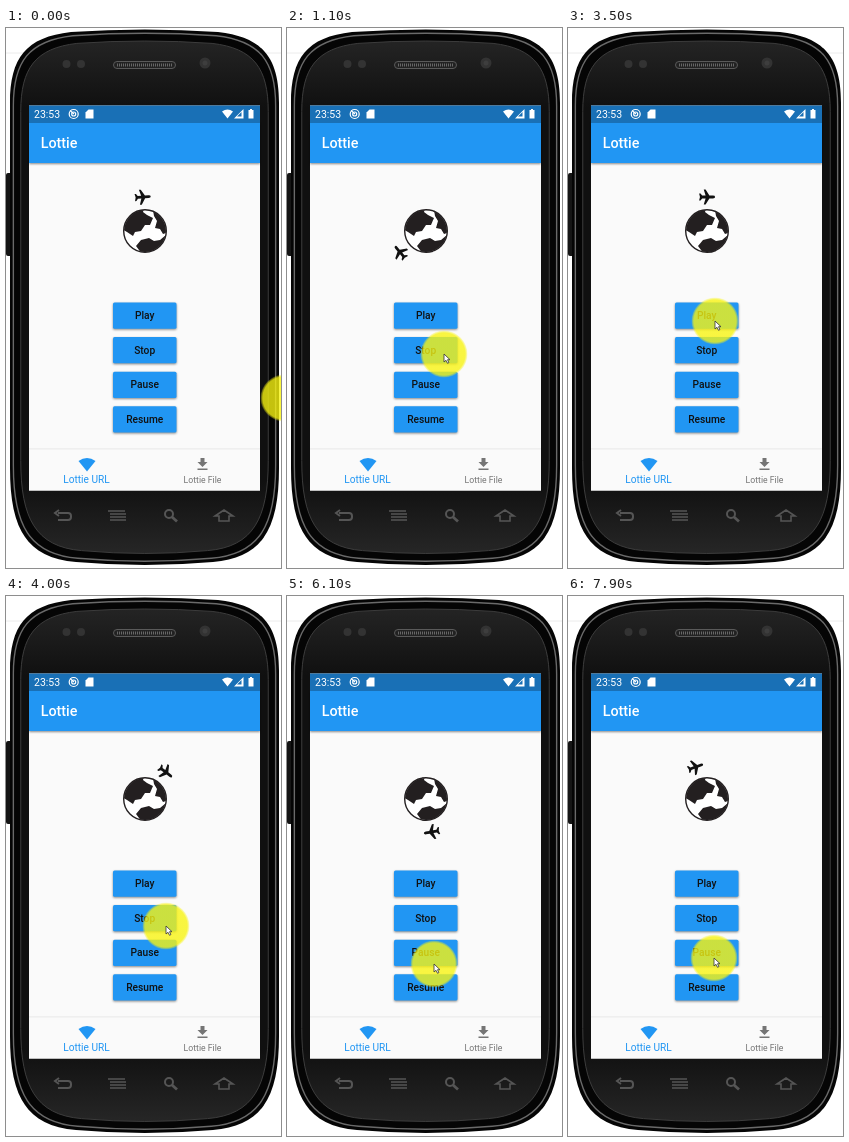
An HTML page that plays this animation: 275 by 540 pixels, repeating every 8 s.

```html
<!DOCTYPE html>
<html lang="en">
<head>
<meta charset="utf-8">
<title>Lottie player</title>
<style>
html, body { margin: 0; width: 100%; height: 100%; overflow: hidden; background: #fff; }
svg { display: block; width: 275px; height: 540px; font-family: Roboto, Arial, sans-serif; }
.shade { filter: drop-shadow(0 1.2px 1.2px rgba(0,0,0,.45)); }
.medium { font-weight: 500; }
</style>
</head>
<body>
<svg viewBox="0 0 275 540">
  <defs>
    <linearGradient id="face" x2="0" y2="1">
      <stop offset="0" stop-color="#242424"/><stop offset=".13" stop-color="#101010"/>
      <stop offset=".86" stop-color="#101010"/><stop offset="1" stop-color="#262626"/>
    </linearGradient>
    <radialGradient id="glow">
      <stop offset=".9" stop-color="#f8f410"/><stop offset="1" stop-color="#f8f410" stop-opacity=".2"/>
    </radialGradient>
    <path id="body" vector-effect="non-scaling-stroke" d="M4 75C4 30 20 9 65 4Q139-1 212 4C257 9 273 30 273 75V440C273 500 257 530 207 534Q139 540 70 534C20 530 4 500 4 440Z"/>
    <clipPath id="ball"><circle cx="139" cy="203" r="21"/></clipPath>
  </defs>

  <path d="M0 25H275" stroke="#ececec"/>
  <rect y="145" width="8" height="83" rx="2" fill="#151515"/>
  <use href="#body" fill="#050505"/>
  <use href="#body" fill="none" stroke="#6a6a6a" stroke-width="1.400" transform="translate(138.5 269) scale(.975 .986) translate(-138.5 -269)"/>
  <use href="#body" fill="url(#face)" stroke="#3c3c3c" transform="translate(138.5 269) scale(.92 .957) translate(-138.5 -269)"/>

  <g fill="#333">
    <circle cx="60.500" cy="36" r="4"/><circle cx="75" cy="36" r="4"/>
    <circle cx="199" cy="35" r="5.500"/>
  </g>
  <circle cx="199" cy="35" r="2.500" fill="#3e3e3e"/>
  <rect x="107.500" y="33.500" width="62" height="7" rx="3.500" fill="#222" stroke="#5a5a5a"/>
  <path d="M111 37H167" stroke="#666" stroke-width="3" stroke-dasharray="1 1"/>

  <g fill="none" stroke="#555" stroke-width="2">
    <path d="M52 485H62Q65 485 65 488V489Q65 492 62 492H52M53 482L49 485L53 488"/>
    <path d="M102 483H119M104 486H120M104 489H120M104 492H120" stroke-width="1.500"/>
    <circle cx="163" cy="486" r="4"/><path d="M166 489L171 493.500" stroke-width="2.800"/>
    <path d="M209 488L218 482L227 488H223V493H213V488Z" stroke-width="1.600"/>
  </g>

  <!-- screen -->
  <rect x="23" y="77.500" width="231" height="385" fill="#fafafa"/>
  <rect class="shade" x="23" y="95" width="231" height="40" fill="#2196f3"/>
  <rect x="23" y="77.500" width="231" height="17.500" fill="#1970b6"/>
  <g fill="#fff">
    <text x="28" y="90.300" font-size="10.500">23:53</text>
    <text class="medium" x="34.700" y="120.300" font-size="14.300">Lottie</text>
    <path d="M82.500 81.500H87.500V90.500H79.500V84.500Z"/>
    <path d="M216 83.500Q221.500 79.500 227 83.500L221.500 90.500ZM237.500 81V90.500H228ZM242.500 82H244V81H246V82H247.500V90.500H242.500Z"/>
    <path d="M235.500 84V88.500H231Z" fill="#1970b6"/>
  </g>
  <g fill="none" stroke="#fff" stroke-width="1.200">
    <circle cx="67.700" cy="86" r="4.500"/><circle cx="67.700" cy="86" r="2"/><path d="M64 82.500L68 86"/>
  </g>

  <circle cx="139" cy="203" r="21.300" fill="#fff"/>
  <g clip-path="url(#ball)" fill="#231f20">
    <path d="M116 201V180H138L137 184L141 187L147 190L144 197L139 197L135 203L129 204L127 208L121 204Z"/>
    <path d="M147 182L163 186V204L157 206L154 201L149 200L151 193L148 188Z"/>
    <path d="M130 218L135 212L143 210L148 213L154 212L160 207V226H136Z"/>
  </g>
  <circle cx="139" cy="203" r="21.300" fill="none" stroke="#231f20" stroke-width="1.400"/>
  <path id="plane" fill="#111" d="M7.500 0Q7.500-1.300 5.500-1.300H2.200L-1.300-7H-3L-1.300-1.300H-4.500L-6-3.300H-7.300L-6.500 0L-7.300 3.300H-6L-4.500 1.300H-1.300L-3 7H-1.300L2.200 1.300H5.500Q7.500 1.300 7.500 0Z"/>

  <g id="buttons" class="medium" font-size="10.200" text-anchor="middle"></g>

  <path d="M23 421H254" stroke="#e2e2e2"/>
  <rect x="23" y="421.500" width="231" height="41" fill="#fafafa"/>
  <g text-anchor="middle">
    <path d="M72.500 433Q81 427 89.500 433L81 443.500Z" fill="#2196f3"/>
    <text x="80.500" y="455" font-size="10.150" fill="#2196f3">Lottie URL</text>
    <path d="M194.500 430H198.500V434H201.500L196.500 439L191.500 434H194.500ZM191.500 440.500H201.500V442H191.500Z" fill="#757575"/>
    <text x="196.500" y="455" font-size="8.700" fill="#757575">Lottie File</text>
  </g>

  <g id="cursor">
    <circle r="23.500" fill="url(#glow)" opacity=".79"/>
    <path d="M0 0V8L2 6.300L3.500 9.300L4.900 8.600L3.500 5.700H6Z" fill="#fff" stroke="#333" stroke-width=".8"/>
  </g>
</svg>
<script>
const LOOP = 8000, STEP = 100;
const $ = id => document.getElementById(id);

// label, top edge, press times
const buttons = [
  ['Play', 274.5, [3600]],
  ['Stop', 309, [1400]],
  ['Pause', 343.7, [4900]],
  ['Resume', 378.3, [6600]]
];
$('buttons').innerHTML = buttons.map(([label, y]) => `
  <rect class="shade" x="107" y="${y}" width="63.5" height="26.3" rx="1.5" fill="#2196f3"/>
  <rect class="splash" x="107" y="${y}" width="63.5" height="26.3" rx="1.5" fill="#fff"/>
  <text x="138.700" y="${y + 16.7}" fill="#111">${label}</text>`).join('');
const splashes = document.querySelectorAll('.splash');

// time, x, y
const path = [
  [0, 278, 370], [600, 198, 355], [900, 177, 334], [1200, 147, 322],
  [2700, 147, 322], [3200, 147, 293], [3800, 147, 293], [4000, 160, 330],
  [4300, 147, 373], [4600, 147, 363], [6000, 147, 363], [6100, 147, 368],
  [6500, 147, 391], [7200, 147, 391], [7500, 147, 381], [7700, 146, 362],
  [LOOP, 146, 362]
];

function cursorAt(t) {
  const i = path.findIndex(p => p[0] > t);
  const [t0, x0, y0] = path[i - 1], [t1, x1, y1] = path[i];
  const k = (t - t0) / (t1 - t0);
  return [x0 + (x1 - x0) * k, y0 + (y1 - y0) * k];
}

// orbit angle in degrees, clockwise from the top
function angleAt(t) {
  if (t < 1400) return t * .54 - 4;
  if (t < 3735) return 0;
  if (t < 6600) return Math.min(170, (t - 3735) * .142);
  return Math.min(340, 170 + (t - 6600) * .142);
}

function draw(now) {
  const t = Math.floor(now % LOOP / STEP) * STEP;
  $('plane').setAttribute('transform',
    `translate(139 202.7) rotate(${angleAt(t)}) translate(0 -33.7) scale(1.08)`);
  $('cursor').setAttribute('transform', `translate(${cursorAt(t)})`);
  buttons.forEach(([, , presses], i) => {
    const lit = presses.some(p => t >= p && t < p + 300);
    splashes[i].setAttribute('opacity', lit ? .1 : 0);
  });
}

const start = performance.now();
function tick() {
  draw(performance.now() - start);
  requestAnimationFrame(tick);
}
tick();
</script>
</body>
</html>
```
